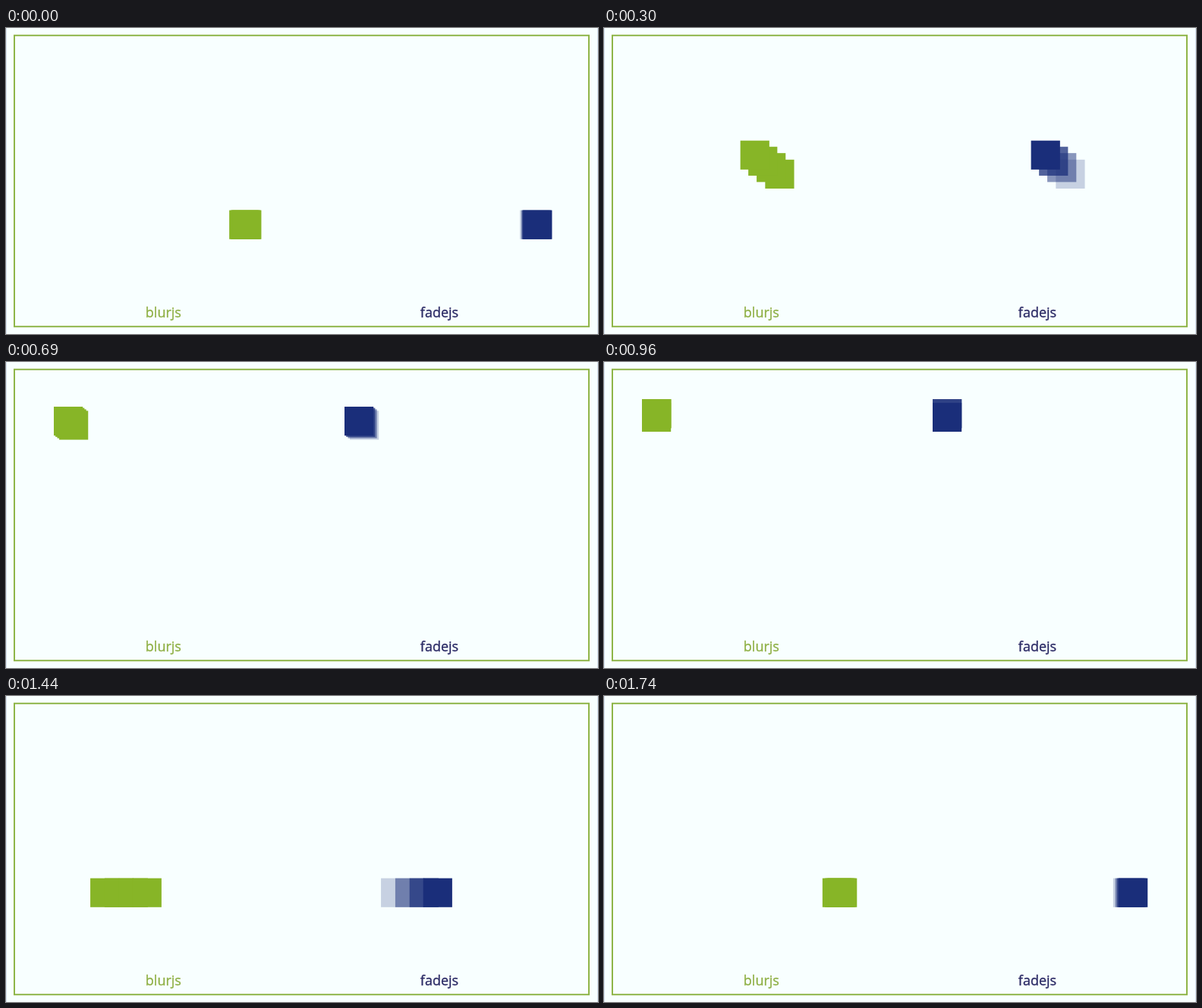
An HTML page with a canvas for the animation above (1.77 s loop, 780x404 px).

```html
<!DOCTYPE html>
<html lang="en">
<head>
<meta charset="utf-8">
<title>blurjs and fadejs</title>
<style>
html, body { margin: 0; width: 100%; height: 100%; overflow: hidden; background: #f8ffff; }
canvas { display: block; }
</style>
</head>
<body>
<canvas id="stage" width="780" height="404"></canvas>
<script>
const ctx = document.getElementById('stage').getContext('2d');
const LOOP = 1770, STEP = 30, CYCLE = 1800, LAG = 18;
const SIZE = 38.2, LEFT = 50, RIGHT = 299.2, TOP = 49, BOTTOM = 240.6;
const GREEN = '#87b527', BLUE = '#1a2e7a';
const FADES = [1, 0.75, 0.5, 0.22];

// cubic-bezier(.25, .1, .25, 1)
function ease(x) {
  const curve = (a, b, s) => 3 * a * s * (1 - s) ** 2 + 3 * b * s * s * (1 - s) + s ** 3;
  let lo = 0, hi = 1;
  for (let i = 0; i < 24; i++) {
    const mid = (lo + hi) / 2;
    if (curve(0.25, 0.25, mid) < x) lo = mid; else hi = mid;
  }
  return curve(0.1, 1, lo);
}

const mix = (a, b, p) => a + (b - a) * p;

// diagonal up, straight down, then right along the base
function place(time) {
  const t = (time + CYCLE) % CYCLE;
  if (t < 900) {
    const p = ease(t / 900);
    return [mix(RIGHT, LEFT, p), mix(BOTTOM, TOP, p)];
  }
  if (t < 1260) return [LEFT, mix(TOP, BOTTOM, ease((t - 900) / 360))];
  return [mix(LEFT, RIGHT, ease((t - 1260) / 540)), BOTTOM];
}

function trail(time, dx, color, fades) {
  ctx.fillStyle = color;
  for (let i = 3; i >= 0; i--) {
    const [x, y] = place(time - i * LAG);
    ctx.globalAlpha = fades ? fades[i] : 1;
    ctx.fillRect(x + dx, y, SIZE, SIZE);
  }
  ctx.globalAlpha = 1;
}

function label(text, x, color) {
  ctx.font = '18px "Open Sans", "Noto Sans", sans-serif';
  ctx.fillStyle = ctx.strokeStyle = color;
  ctx.lineWidth = 0.35;
  ctx.fillText(text, x, 381.5);
  ctx.strokeText(text, x, 381.5);
}

function draw(t) {
  ctx.fillStyle = '#f8ffff';
  ctx.fillRect(0, 0, 780, 404);
  ctx.fillStyle = '#d5e2f0';
  ctx.fillRect(0, 0, 1, 404);
  ctx.fillRect(779, 0, 1, 404);
  ctx.strokeStyle = '#8fb548';
  ctx.lineWidth = 2;
  ctx.strokeRect(11, 9.8, 757, 384.4);
  label('blurjs', 183.8, '#8fb045');
  label('fadejs', 545.8, '#2c2b66');

  // the clock skips ahead slightly for the last leg
  const time = t - (t > 1260 ? 30 : 45);
  trail(time, 0, GREEN);
  trail(time, 383, BLUE, FADES);
}

const start = performance.now();
function tick() {
  const t = (performance.now() - start) % LOOP;
  draw(Math.floor(t / STEP) * STEP);
  requestAnimationFrame(tick);
}
tick();
</script>
</body>
</html>
```
